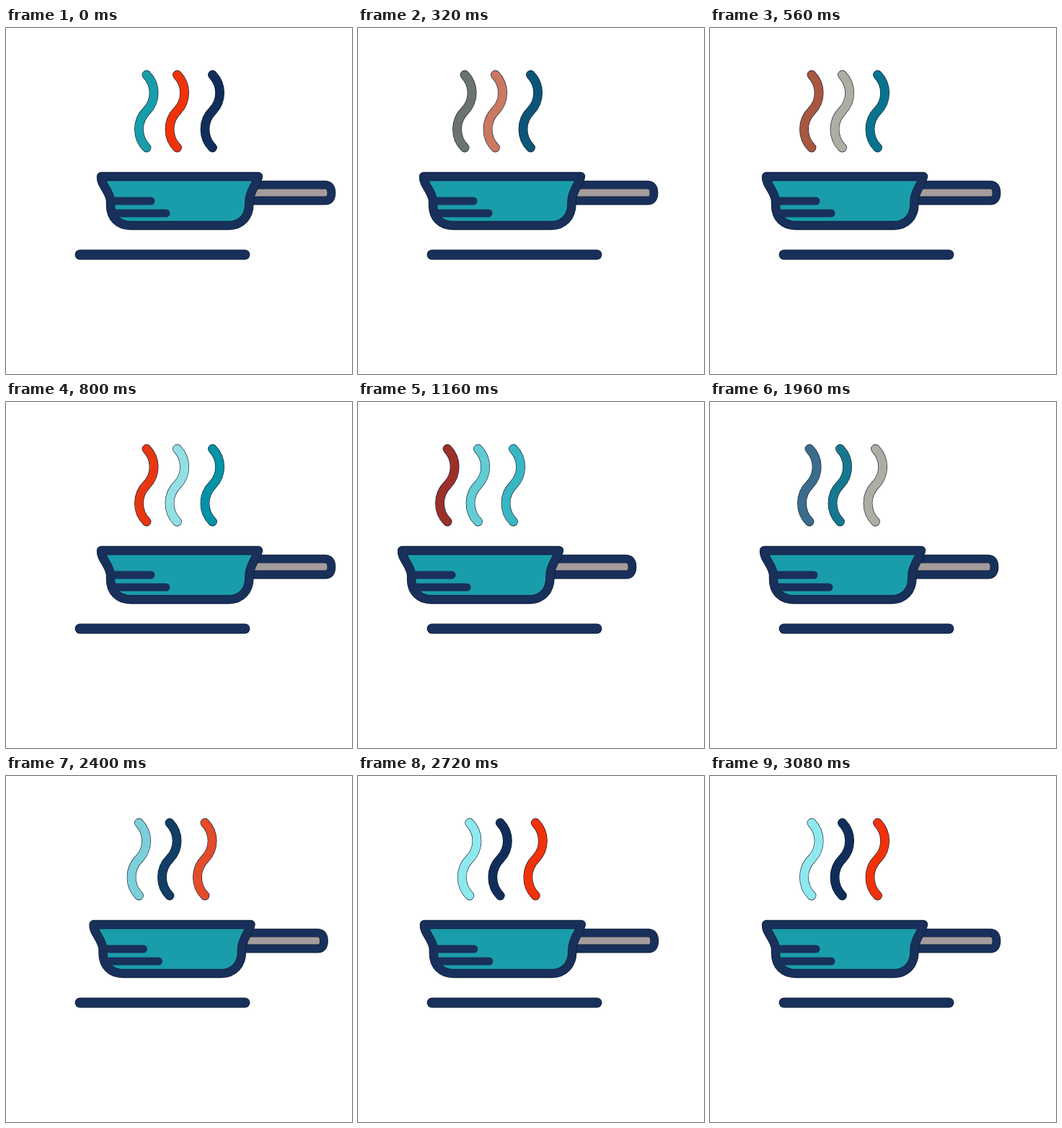
Write an HTML page with a canvas that moves like this. It is 480 px wide and 480 px high and loops after 3.12 s.

```html
<!DOCTYPE html>
<html lang="en">
<head>
<meta charset="utf-8">
<title>Steaming pan</title>
<style>
html, body { margin: 0; width: 100%; height: 100%; overflow: hidden; background: #fff; }
canvas { display: block; }
</style>
</head>
<body>
<canvas id="stage" width="480" height="480"></canvas>
<script>
const ctx = document.getElementById("stage").getContext("2d");
const LOOP = 3120, STEP = 40, CYCLE = 840;
const NAVY = "#18305a", EDGE = "#0c1a30", TEAL = "#1a9dab", GREY = "#a59c9c";

const teal = [24, 157, 170], red = [240, 50, 10], navy = [17, 45, 90];
const cyan = [142, 233, 238], deepTeal = [4, 150, 170];
const steams = [
  { x: 195, hues: [teal, red, navy, cyan] },
  { x: 237.5, hues: [red, cyan, teal, navy] },
  { x: 286.5, hues: [navy, deepTeal, cyan, red] }
];

// Horizontal offset as [time, x]: a gentle first swing, then a repeated toss.
const back = [[560, -54], [720, -10.5], [800, 0], [840, 4]];
const firstPan = [[0, 0], [320, -41], [480, -71], ...back];
const firstSteam = [[0, 0], [320, -47], [480, -71], ...back];
const toss = [[0, 4], [80, -15], [280, -57], [320, -71], [360, -68], ...back];

function along(keys, t) {
  let i = 1;
  while (i < keys.length - 1 && t > keys[i][0]) i++;
  const [t0, a] = keys[i - 1], [t1, b] = keys[i];
  return a + (b - a) * (t - t0) / (t1 - t0);
}

const offset = (t, first) => t < CYCLE ? along(first, t) : along(toss, t % CYCLE);

function hue(hues, t) {
  const p = Math.min(t / CYCLE, 3), i = Math.min(Math.floor(p), 2), f = p - i;
  return `rgb(${hues[i].map((v, k) => Math.round(v + (hues[i + 1][k] - v) * f))})`;
}

function stroke(path, color, width) {
  ctx.lineWidth = width;
  ctx.strokeStyle = color;
  ctx.stroke(path);
}

function edged(path, color, width) {
  stroke(path, EDGE, width + 0.8);
  stroke(path, color, width - 0.4);
}

const wave = new Path2D("M0 65 C13.5 79 13.5 101 0 115 C-14 129 -14 152 0 166");
const ground = new Path2D("M102.5 314.5 H331.5");
const handle = new Path2D("M340 217.7 H443 Q451.5 218 451.5 228.7 Q451.5 239.5 443 239.5 H332 Z");
const body = new Path2D("M132 206 H350 C348 217 338 226 337.5 240 V244 " +
  "C337.5 262 326 274 309 274 H173 C156 274 145 263 145 246 V240 C144 226 131 217 132 206 Z");
const stripes = new Path2D("M147 240 H201 M150 257 H222");

function drawPan(x) {
  ctx.save();
  ctx.translate(x, 0);
  ctx.fillStyle = GREY;
  ctx.fill(handle);
  edged(handle, NAVY, 11);
  ctx.fillStyle = TEAL;
  ctx.fill(body);
  edged(body, NAVY, 11.6);
  stroke(stripes, NAVY, 11);
  ctx.restore();
}

function drawSteam(x, t) {
  for (const s of steams) {
    ctx.save();
    ctx.translate(s.x + x, 0);
    edged(wave, hue(s.hues, t), 12);
    ctx.restore();
  }
}

// The motion runs on a coarse clock with three short holds.
function clock(now) {
  const t = Math.floor((now % LOOP) / STEP) * STEP;
  return [40, 640, 1600].includes(t) ? t - STEP : t;
}

function draw(now) {
  const t = clock(now);
  ctx.fillStyle = "#fff";
  ctx.fillRect(0, 0, 480, 480);
  ctx.lineCap = ctx.lineJoin = "round";
  edged(ground, NAVY, 13);
  drawPan(offset(t, firstPan));
  drawSteam(offset(t, firstSteam), t);
}

let start;
function tick(now) {
  if (start === undefined) start = now;
  draw(now - start);
  requestAnimationFrame(tick);
}
draw(0);
requestAnimationFrame(tick);
</script>
</body>
</html>
```
